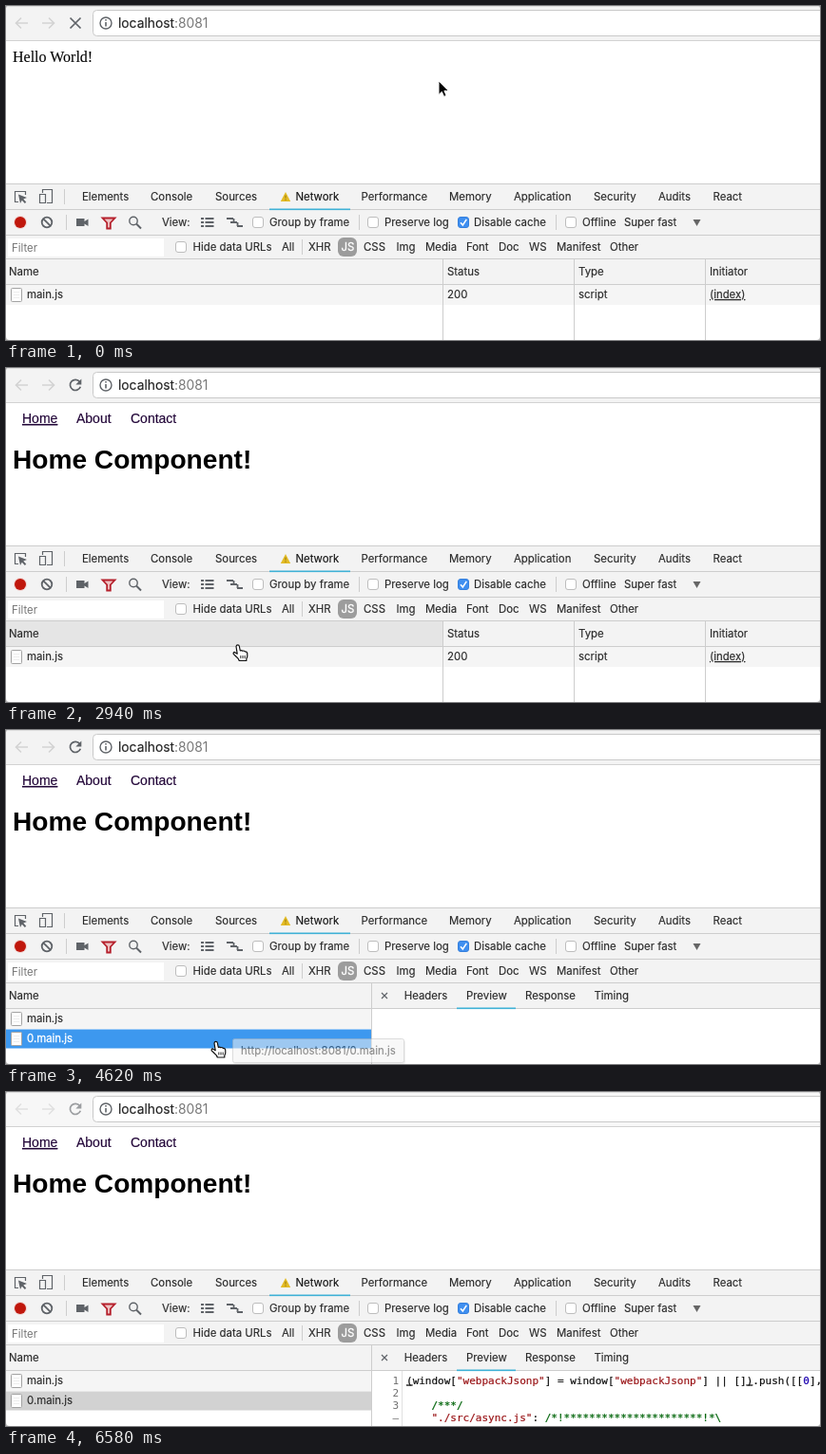
These frames come from a looping animation (856x352 px, 6650 ms). An HTML page:

```html
<!DOCTYPE html>
<html lang="en">
<head>
<meta charset="utf-8">
<title>Lazy loading in the network panel</title>
<style>
html, body { margin: 0; width: 100%; height: 100%; overflow: hidden; background: #bbb; }
svg { display: block; width: 856px; height: 352px; border-radius: 4px; background: #fff; }
text { white-space: pre; font: 11.4px Inter, Roboto, sans-serif; fill: #2b2b2b; stroke: #2b2b2b; stroke-width: .15; }
.url { font-size: 13.8px; fill: #222; }
.serif { font: 16px "Liberation Serif", serif; fill: #000; }
.nav { font: 14px "Liberation Sans", sans-serif; fill: #220638; stroke: #220638; }
.title { font: bold 28.1px "Liberation Sans", sans-serif; fill: #000; stroke: none; }
.code { font: 11px "DejaVu Sans Mono", monospace; fill: #111; stroke: #111; stroke-width: .2; }
.num { font: 11px "DejaVu Sans Mono", monospace; fill: #707070; stroke: none; text-anchor: end; }
.str { fill: #9a1518; stroke: #9a1518; }
.com { fill: #00650a; stroke: #00650a; }
.val { fill: #1c00b0; stroke: #1c00b0; }
.link { text-decoration: underline; }
.dim { fill: #757575; stroke: none; }
.light { fill: #fff; stroke: #fff; stroke-width: .3; }
.ico { fill: none; stroke: #5f6368; stroke-width: 1.4; }
</style>
</head>
<body>
<svg id="stage" viewBox="0 0 856 352" xmlns="http://www.w3.org/2000/svg"></svg>
<script>
const LOOP = 6650, STEP = 70;
const NS = "http://www.w3.org/2000/svg";
const stage = document.getElementById("stage");
const BAR = "#f3f3f3", LINE = "#cdcdcd", TEAL = "#3fb1d6";

function add(parent, tag, attrs = {}, text) {
  const el = document.createElementNS(NS, tag);
  for (const k in attrs) el.setAttribute(k, attrs[k]);
  if (text !== undefined) el.textContent = text;
  parent.appendChild(el);
  return el;
}
const group = (p = stage) => add(p, "g");
const rect = (p, x, y, w, h, fill, more) =>
  add(p, "rect", { x, y, width: w, height: h, fill, ...more });
const label = (p, x, y, text, cls = "") => add(p, "text", { x, y, class: cls }, text);
const labels = (p, y, list, cls) => list.forEach(([x, s]) => label(p, x, y, s, cls));
const path = (p, d, more) => add(p, "path", { d, class: "ico", ...more });
const solid = (p, d, fill) => add(p, "path", { d, fill });
const vline = (p, x, y, h, fill = LINE) => rect(p, x, y, 1, h, fill);

function spans(p, x, y, parts) {
  const t = add(p, "text", { x, y, class: "code" });
  parts.forEach(([s, cls = ""]) => add(t, "tspan", { class: cls }, s));
}

function checkbox(p, x, y, on) {
  rect(p, x + .5, y + .5, 11, 11, on ? "#3f8ff0" : "#fff",
    { rx: 2.5, stroke: on ? "#3580dd" : "#bdbdbd" });
  if (on) path(p, `M${x + 3} ${y + 6.3}l2.3 2.6 4-6`, { style: "stroke:#fff;stroke-width:1.6" });
}

function fileIcon(p, y) {
  rect(p, 5.5, y + .5, 11, 14, "#fff", { rx: 1, stroke: "#a3a3a3" });
  path(p, `M8 ${y + 4.5}h6m-6 3h6m-6 3h6`, { style: "stroke:#ececec;stroke-width:1" });
}

// Browser bar
function browserBar() {
  const p = group();
  const back = rect(p, 0, 0, 856, 36, BAR);
  rect(p, 0, 0, 856, 1, "#dedede");
  rect(p, 0, 36, 856, 1, "#d2d2d2");
  rect(p, 91.5, 4.5, 780, 27, "#fff", { rx: 4, stroke: "#c9c9c9" });
  const arrows = path(p, "M23 18H10.5m5.5-5.5L10.5 18l5.5 5.5M38 18h12.5M45 12.5l5.5 5.5-5.5 5.5",
    { style: "stroke:#d3d3d3;stroke-width:1.6" });
  add(p, "circle", { cx: 105, cy: 18, r: 6, class: "ico" });
  path(p, "M105 17v4.5M105 14v1.5", { style: "stroke-width:1.6" });
  const t = label(p, 118, 23, "localhost", "url");
  add(t, "tspan", { fill: "#777", stroke: "none" }, ":8081");
  const stop = path(p, "M67.5 12.5l11 11m0-11l-11 11", { style: "stroke-width:1.7" });
  const reload = group(p);
  path(reload, "M77.5 14.5A5.6 5.6 0 1 0 78.3 19.8", { style: "stroke-width:1.7" });
  solid(reload, "M79.3 11.5v6h-6z", "#5f6368");
  return { back, arrows, stop, reload };
}

// Page contents
const hello = group();
label(hello, 7, 59, "Hello World!", "serif");

const home = group();
label(home, 17, 58, "Home", "nav link");
labels(home, 58, [[74, "About"], [131, "Contact"]], "nav");
label(home, 7, 106, "Home Component!", "title");

const { back, arrows, stop, reload } = browserBar();

function toolbars() {
  const p = group();
  rect(p, 0, 187, 856, 106, BAR);
  [187, 214, 241, 266, 293].forEach(y => rect(p, 0, y, 856, 1, LINE));
  rect(p, 277, 213.5, 85, 1.6, TEAL);

  labels(p, 205, [[80, "Elements"], [152, "Console"], [220, "Sources"], [373.5, "Performance"],
    [466, "Memory"], [534, "Application"], [618, "Security"], [686, "Audits"], [743.5, "React"]]);
  label(p, 304.5, 205, "Network").style.fill = "#111";
  path(p, "M13 206.5H9.5V195.5h11V199", { style: "stroke-width:1.2" });
  solid(p, "M13 198.5l9 3.5-3.7 1.4 3 3.4-1.5 1.3-3-3.4-1.8 3.2z", "#5f6368");
  path(p, "M38.5 197v-3.5h10v14H43M35.5 198.5h6v9h-6z", { style: "stroke-width:1.2" });
  vline(p, 61, 193, 16);
  solid(p, "M294 196l5.2 10h-10.4z", "#e3bb25");
  path(p, "M294 199.5v3m0 1v1.2", { style: "stroke:#a08010;stroke-width:1.2" });

  add(p, "circle", { cx: 15, cy: 228, r: 7.2, fill: "#f1d9d7" });
  add(p, "circle", { cx: 15, cy: 228, r: 6, fill: "#c0170c" });
  add(p, "circle", { cx: 43, cy: 228, r: 5.3, class: "ico", style: "stroke-width:1.8" });
  path(p, "M39.3 224.3l7.4 7.4", { style: "stroke-width:1.8" });
  vline(p, 63, 220, 16);
  solid(p, "M74 224h8.5v3l4-2.5v7.5l-4-2.5v2.5H74z", "#5f6368");
  path(p, "M101.5 223.5h13l-4.7 5v6h-3.6v-6z", { style: "stroke:#b5202c;stroke-width:1.8;fill:#efc4c4" });
  add(p, "circle", { cx: 134, cy: 226.5, r: 4.2, class: "ico" });
  path(p, "M137 229.5l5 5", { style: "stroke-width:2" });
  path(p, "M205 224h3m1.5 0h9M205 228h3m1.5 0h9M205 232h3m1.5 0h9", { style: "stroke-width:2.2" });
  path(p, "M232 224h7M236 228h7m0 4h6M239.5 224v4m4 0v4", { style: "stroke-width:1.8" });
  [[259, 0], [380, 0], [475, 1], [588, 0]].forEach(([x, on]) => checkbox(p, x, 222, on));
  [371, 578].forEach(x => vline(p, x, 220, 16));
  labels(p, 232, [[164, "View:"], [277, "Group by frame"], [398, "Preserve log"],
    [492, "Disable cache"], [606, "Offline"], [650, "Super fast"]]);
  solid(p, "M722.5 225h8l-4 7z", "#666");

  rect(p, 2, 245, 164, 19, "#fff");
  label(p, 6, 259, "Filter", "dim");
  checkbox(p, 178, 248, 0);
  vline(p, 311, 246, 16);
  rect(p, 349, 244, 20, 20, "#9c9c9c", { rx: 6 });
  labels(p, 258, [[196.5, "Hide data URLs"], [290, "All"], [318, "XHR"], [376, "CSS"], [410.5, "Img"],
    [441, "Media"], [484, "Font"], [518, "Doc"], [550, "WS"], [579, "Manifest"], [635, "Other"]]);
  label(p, 352.5, 258, "JS", "light");
}
toolbars();

// Request list
const list = group();
const headHover = rect(list, 0, 267, 459, 26, "#e5e5e5");
rect(list, 0, 294, 856, 21, "#f5f5f5");
const rowBg = rect(list, 0, 315.5, 856, 20, "#f1f6fd");
label(list, 3, 284, "Name");
label(list, 22, 308, "main.js");
fileIcon(list, 297);
const second = group(list);
const secondName = label(second, 22, 329, "0.main.js");
fileIcon(second, 318);

const columns = group();
[459, 597, 735].forEach(x => vline(columns, x, 267, 85));
labels(columns, 284, [[464, "Status"], [602, "Type"], [740, "Initiator"]]);
labels(columns, 308, [[464, "200"], [602, "script"]]);
label(columns, 740, 308, "(index)", "link");
const secondCells = group(columns);
labels(secondCells, 329, [[464, "200"], [602, "script"]]);
label(secondCells, 740, 329, "main.js:828", "link");

// Preview pane
const pane = group();
rect(pane, 385, 267, 471, 26, BAR);
rect(pane, 385, 293, 471, 1, LINE);
rect(pane, 385, 294, 471, 58, "#fff");
vline(pane, 384, 267, 85);
path(pane, "M395 277l6 6m0-6l-6 6", { style: "stroke-width:1.2" });
labels(pane, 284, [[418.7, "Headers"], [484, "Preview"], [546, "Response"], [618.5, "Timing"]]);
rect(pane, 474, 292.5, 62, 1.6, TEAL);

const code = group(pane);
vline(code, 416, 294, 58, "#e0e0e0");
["1", "2", "3", "–"].forEach((n, i) => label(code, 413, 307.5 + 13 * i, n, "num"));
const jsonp = ['"webpackJsonp"', "str"];
spans(code, 421, 307.5, [["(", "link"], ["window["], jsonp, ["] = window["], jsonp,
  ["] || []"], [")", "link"], [".push([["], ["0", "val"], ["],"]]);
spans(code, 421, 333.5, [["    /***/", "com"]]);
spans(code, 421, 346.5, [["    "], ['"./src/async.js"', "str"], [": "],
  ["/*!" + "*".repeat(22) + "!*\\", "com"]]);
spans(code, 421, 359.5, [["  !*** ./src/async.js ***!", "com"]]);

const tip = group();
rect(tip, 239, 327, 181, 25, "#000", { rx: 2, opacity: .12 });
rect(tip, 238.5, 325.5, 180, 25, "#f2f2f2", { rx: 2, stroke: "#bdbdbd" });
label(tip, 247, 342, "http://localhost:8081/0.main.js");

// Pointers, with the hot spot at 0,0
const arrow = group();
add(arrow, "path", { d: "M0 0V14.5L3.3 11.4 5.6 16.5 8.1 15.4 5.9 10.4H10.5Z",
  fill: "#000", stroke: "#fff", "stroke-width": 1 });
const hand = group();
add(hand, "path", {
  d: "M-2 1.5Q-1.8-.2-.3-.2T1.4 1.5L2.3 6Q3.5 5.2 4.8 6.2 6.2 5.6 7.3 6.9 9.3 6.7 9.7 8.5L9.8 11.5Q9.6 13.5 8.8 14.5V16.5H1.3Q.8 14.5-1.6 12.5L-4.8 9.3Q-5.2 7.6-3.7 7.4L-.8 9.2Z",
  fill: "#fff", stroke: "#111", "stroke-width": 1.2, "stroke-linejoin": "round" });
path(hand, "M2.8 11v3m2.2-3v3m2.2-3v3", { style: "stroke:#111;stroke-width:.9" });

// Pointer track: time, x, y; it leaves through the lower edge
const track = [[0, 455, 79], [2310, 455, 79], [2380, 408, 103], [2660, 312, 205], [2940, 244, 292],
  [3010, 240, 299], [3220, 236, 308], [3360, 234, 311], [3990, 223, 317], [4130, 221, 328.5],
  [5880, 221, 328.5], [6160, 215, 362], [LOOP, 215, 362]];

function pointerAt(t) {
  const i = track.findIndex(k => k[0] > t);
  const [t0, x0, y0] = track[i - 1], [t1, x1, y1] = track[i];
  const f = (t - t0) / (t1 - t0);
  return [x0 + (x1 - x0) * f, y0 + (y1 - y0) * f];
}
const show = (el, on) => { el.style.display = on ? "" : "none"; };

const LOADED = 2590, CHUNK = 3010, HINT = 4200, CLICK = 4550, CODE = 4830, BLUR = 6300;

function draw(t) {
  const [x, y] = pointerAt(t);
  const loaded = t >= LOADED, chunk = t >= CHUNK, open = t >= CLICK, blurred = t >= BLUR;
  show(hello, !loaded);
  show(home, loaded);
  show(stop, !loaded);
  show(reload, loaded);
  back.setAttribute("fill", blurred ? "#f7f7f7" : BAR);
  arrows.style.opacity = reload.style.opacity = blurred ? .6 : 1;

  show(headHover, y >= 267 && y < 294);
  show(second, chunk);
  show(secondCells, chunk);
  show(columns, !open);
  show(pane, open);
  show(code, t >= CODE);
  const active = open && !blurred;
  show(rowBg, open || (chunk && y >= 315));
  rowBg.setAttribute("fill", active ? "#3d98ef" : open ? "#d2d2d2" : "#f1f6fd");
  secondName.setAttribute("class", active ? "light" : "");

  show(tip, t >= HINT && t < 4760);
  tip.style.opacity = t < CLICK ? 1 : Math.max(0, 1 - (t - CLICK) / 150);

  const point = y >= 267;
  show(arrow, !point);
  show(hand, point);
  (point ? hand : arrow).setAttribute("transform", `translate(${x} ${y})`);
}

const start = performance.now();
function tick() {
  const t = (performance.now() - start) % LOOP;
  draw(Math.floor(t / STEP) * STEP);
  requestAnimationFrame(tick);
}
draw(0);
requestAnimationFrame(tick);
</script>
</body>
</html>
```
